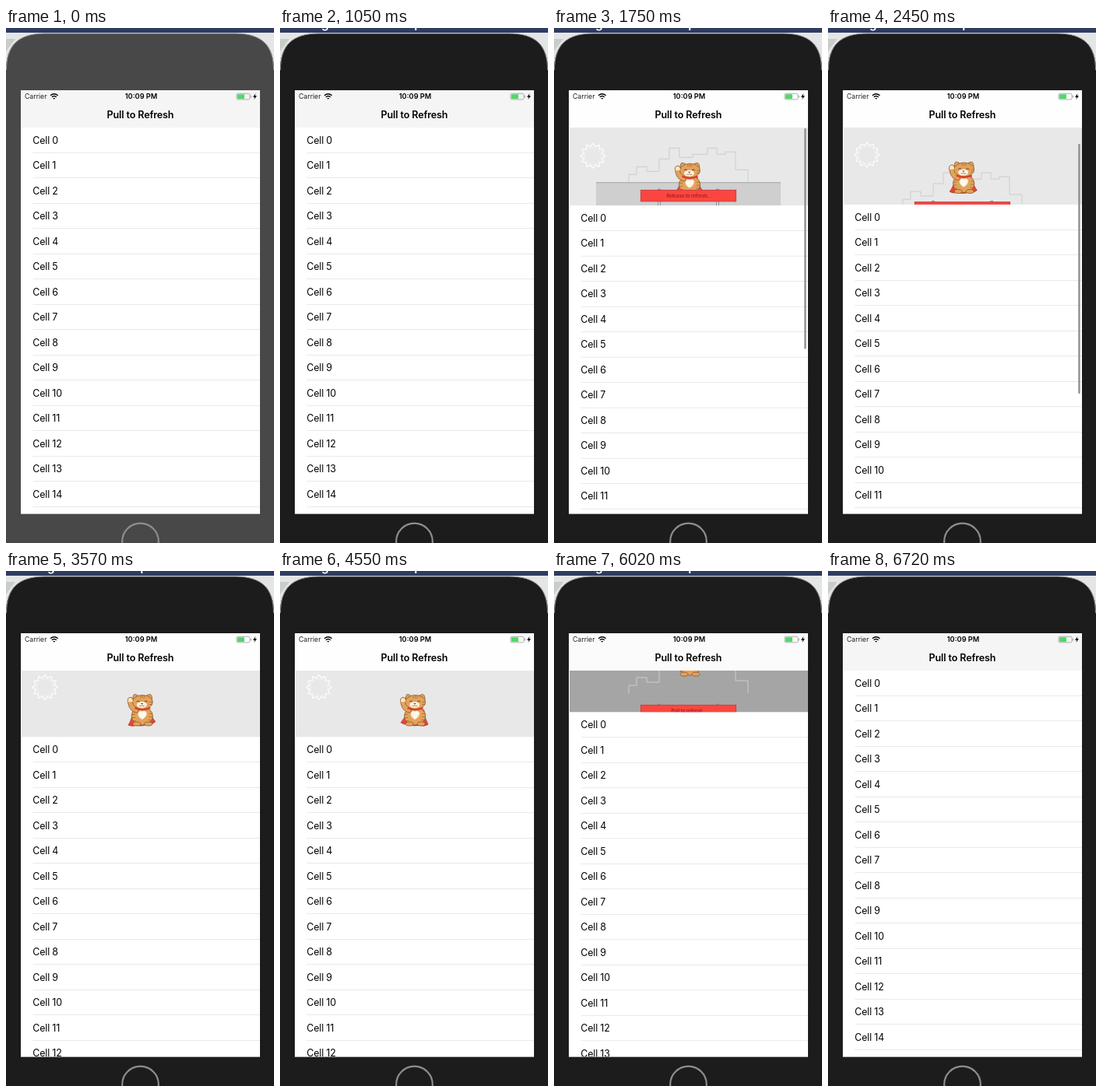
An HTML page for the animation above (6.79 s loop, 344x662 px).

```html
<!DOCTYPE html>
<html lang="en">
<head>
<meta charset="utf-8">
<title>Pull to Refresh</title>
<style>
  html, body { margin: 0; width: 100%; height: 100%; overflow: hidden; background: #222; }
  svg { display: block; width: 100%; height: 100%; }
  text { font-family: Inter, "Open Sans", sans-serif; }
  .row { font-size: 12.4px; letter-spacing: -.14px; }
</style>
</head>
<body>
<svg viewBox="0 0 344 662">
  <defs>
    <clipPath id="screen"><rect x="19" y="80" width="307" height="544.5"/></clipPath>
    <clipPath id="content"><rect x="19" y="128" width="307" height="496.5"/></clipPath>
    <clipPath id="sceneClip"><rect id="sceneBox" x="20" y="128" width="306" height="0"/></clipPath>
  </defs>

  <!-- desktop behind the phone -->
  <rect width="344" height="662" fill="#242727"/>
  <rect y="5" width="344" height="44" fill="#e4e5e6"/>
  <path d="M0 14H12L0 30Z" fill="#c9cdc9"/>
  <path d="M.5 248V302M.5 382V416M.5 500V530M.5 605V632" stroke="#3e6a60"/>
  <rect width="344" height="6" fill="#2f3c61"/>
  <text id="caption" x="20" y=".3" font-size="15.5" font-weight="600" fill="#fff">Design the current tip</text>

  <!-- phone -->
  <path id="bezel" d="M0 662V54C0 22 16 7 50 7H294C328 7 344 22 344 54V662Z"/>
  <path d="M.5 54C.5 22 16 7 50 7H294C328 7 343.5 22 343.5 54" fill="none" stroke="#9a9a9a"/>
  <circle cx="172.5" cy="660" r="23.3" fill="none" stroke="#8d8d8d" stroke-width="2.2"/>

  <g clip-path="url(#screen)">
    <rect x="19" y="80" width="307" height="545" fill="#fff"/>
    <g clip-path="url(#content)">
      <g clip-path="url(#sceneClip)">
        <rect id="sky" x="20" y="128" width="306" height="500"/>
        <path id="buildings" fill="none" stroke="#cdcdcd"
          d="M96-30V-40H106V-50H119V-44H135V-60H148V-74H161V-62H178V-66H197V-74H209V-66H220V-69H233V-46H249V-30"/>
        <g id="sun" fill="none" stroke="#fff"><path id="rays" stroke-width="1.1"/><circle cx="50" cy="-64" r="11" stroke-opacity=".4"/></g>
        <g id="ground">
          <rect x="54" y="-30" width="237" height="130" fill="#cfcfcf"/>
          <path d="M54-29.5H291" stroke="#a6a6a6"/>
        </g>
        <path id="cape" fill="#e8443a" stroke="#a92b25" stroke-width=".7"
          d="M164-36Q162-25 156-17Q161-14 166-16Q173-13 181-16Q186-14 191-18Q186-25 184-36Z"/>
        <g id="cat" fill="#e3a25c" stroke="#8a5829" stroke-width=".8">
          <path d="M162.5-46Q161.500-54 164-55Q167.500-55 169.500-52.500H178.500Q181-55 184.500-55Q187.500-53 186.500-46Z"/>
          <ellipse cx="174" cy="-27" rx="13.700" ry="11.500"/>
          <ellipse cx="167" cy="-17" rx="5" ry="2.500"/>
          <ellipse cx="182" cy="-17" rx="5" ry="2.500"/>
          <path d="M169-31Q158-32 156-43Q154-50 158-51Q163-52 162.500-45Q163-40 169-38Z"/>
          <ellipse cx="174.500" cy="-45" rx="13" ry="9"/>
          <path d="M156-45Q155.200-50 158.500-50.500Q162-50 162-45.500Z" fill="#f8e5c5" stroke="none"/>
          <ellipse cx="173.500" cy="-41.500" rx="6.500" ry="4" fill="#fff4e2" stroke="none"/>
          <path d="M172-53V-50M174.500-53.500V-50M177-53V-50M187-45H183.500M187-42H183M187-30H183M187.500-26H183M186-22H182M161-29H165M161-25H165M162-21H166" fill="none" stroke="#a8682c"/>
          <path d="M167-45.500Q169-47.500 171-45.500M177-45.500Q179-47.500 181-45.500" fill="none" stroke="#4a2f18"/>
          <path d="M172-43.500H175.500L173.700-42Z" fill="#5b3320" stroke="none"/>
          <path d="M170.500-40.500Q172.500-38.500 173.700-41Q175-38.500 177-40.500" fill="none" stroke="#70442a" stroke-width=".7"/>
          <path d="M164.500-37.500Q174-33 184.500-37.500" fill="none" stroke="#e03a32" stroke-width="2.200"/>
          <path d="M174-22.500Q168-26 168.500-31Q171-35 174-33Q178-35 180-31Q180-26 174-22.500Z" fill="#fff8ea" stroke="#e2c79b" stroke-width=".5"/>
        </g>
        <g id="sign">
          <path d="M133.500-21.300V30M136.500-21.300V30M208.500-21.300V30M211.500-21.300V30M133-21H137M208-21H212" stroke="#777" stroke-width=".7"/>
          <rect x="111.500" y="-19.800" width="122" height="14.300" fill="#fb4640" stroke="#cf4440" stroke-width="1.200"/>
          <text id="signText" x="173.500" y="-10.600" font-size="6" font-weight="600" text-anchor="middle" fill="#a3201d"></text>
        </g>
      </g>
      <g id="list"></g>
      <rect id="bar" x="321.300" width="2.300" rx="1.150" fill="#8b8b8b"/>
    </g>

    <!-- navigation and status bar -->
    <rect id="nav" x="19" y="80" width="307" height="48"/>
    <text x="24" y="91.200" font-size="8.700" fill="#222">Carrier</text>
    <path d="M57 86.800Q61.800 82.800 66.600 86.800M58.800 88.800Q61.800 86.200 64.800 88.800" fill="none" stroke="#000" stroke-width="1.400"/>
    <path d="M60.200 89.900H63.400L61.800 91.700Z"/>
    <text x="173.500" y="91.400" font-size="9.200" font-weight="600" text-anchor="middle">10:09 PM</text>
    <rect x="296" y="84.300" width="17" height="7.600" rx="1.700" fill="none" stroke="#9a9a9a" stroke-width=".8"/>
    <rect x="297" y="85.200" width="9" height="5.800" rx=".8" fill="#52d769"/>
    <path d="M314.300 86.700V89.500" stroke="#9a9a9a"/>
    <path d="M320.500 84L317 88.700H319.300L318.300 92L322 87.300H319.600Z"/>
    <text x="172.500" y="116.200" font-size="12.500" font-weight="600" letter-spacing="-.1" text-anchor="middle">Pull to Refresh</text>
  </g>
</svg>
<script>
const LOOP = 6790, STEP = 70;
const TOP = 128, ROW = 32.5, SCENE = 85.5, REACH = 100.3, SINK = 85;
const DRAG = 1150, RELEASE = 2365, FINISH = 5850, FINISHED = 6260;

const $ = id => document.getElementById(id);
const clamp = v => Math.min(1, Math.max(0, v));
const span = (t, a, b) => clamp((t - a) / (b - a));
const lerp = (a, b, k) => a + (b - a) * k;
const smooth = k => k * k * (3 - 2 * k);
const easeOut = k => 1 - (1 - k) ** 2;
const gray = v => { const c = Math.round(v); return `rgb(${c},${c},${c})`; };

$('list').innerHTML = '<rect x="19" width="307" height="660" fill="#fff"/>' +
  Array.from({ length: 20 }, (_, i) =>
    `<text class="row" x="34.3" y="${i * ROW + 20.7}">Cell ${i}</text>` +
    `<rect x="34.5" y="${(i + 1) * ROW - .4}" width="292" height=".4" fill="#c8c7cc"/>`
  ).join('');

$('rays').setAttribute('d', 'M' + Array.from({ length: 24 }, (_, i) => {
  const a = i * Math.PI / 12, r = i % 2 ? 12.3 : 16;
  return `${(50 + r * Math.sin(a)).toFixed(1)} ${(-64 - r * Math.cos(a)).toFixed(1)}`;
}).join('L') + 'Z');

function pullAt(t) {
  if (t < RELEASE) return REACH * smooth(easeOut(span(t, DRAG, 1800)));
  if (t < FINISH) return lerp(REACH, SCENE, smooth(span(t, 2400, 2680)));
  return SCENE * (1 - smooth(span(t, FINISH, FINISHED)));
}

function draw(t) {
  const pull = pullAt(t), p = clamp(pull / SCENE), bottom = TOP + pull;
  const sink = smooth(span(t, RELEASE, RELEASE + 200)) * SINK * p;
  const refreshing = t > RELEASE && t < FINISH;

  // Each layer drifts in at its own rate as the list is pulled.
  const place = (id, ratio, drop = 0, x = 0, extra = '') =>
    $(id).setAttribute('transform',
      `translate(${x} ${bottom - ratio * SCENE * (1 - p) + drop})${extra}`);

  // Shiver: 200 ms each way.
  const beat = Math.abs(((t - RELEASE) / 200 % 2 + 2) % 2 - 1);
  const sway = refreshing ? lerp(-1, 1, smooth(beat)) : 0;

  place('buildings', 1.5, sink);
  place('sun', 3);
  place('ground', .5, sink);
  place('cape', -1, 0, 0, ` rotate(${sway * -5.6} 173 -27)`);
  place('cat', 1, 0, sway * .8);
  place('sign', .5, sink / 2);
  $('signText').textContent = (p < 1 ? 'Pull' : 'Release') + ' to refresh...';

  $('sceneBox').setAttribute('height', pull);
  $('sky').setAttribute('fill', gray(255 * (.21 + .7 * p)));
  $('nav').setAttribute('fill', gray(lerp(245, 254, p)));
  $('list').setAttribute('transform', `translate(0 ${bottom})`);

  const barTop = lerp(TOP + 1, 213, smooth(span(t, 2385, 2590)));
  const barEnd = lerp(TOP + 385 - pull, 485, smooth(span(t, 2330, 2500)));
  $('bar').setAttribute('y', barTop);
  $('bar').setAttribute('height', barEnd - barTop);
  $('bar').setAttribute('opacity', span(t, DRAG, DRAG + 60) * (1 - span(t, 3200, 3420)));

  $('bezel').setAttribute('fill', t < 1050 ? '#484848' : '#1c1c1c');
  $('caption').setAttribute('opacity', t >= 910 && t < 6720 ? 1 : 0);
}

const start = performance.now();
function tick() {
  const t = (performance.now() - start) % LOOP;
  draw(Math.floor(t / STEP) * STEP);
  requestAnimationFrame(tick);
}
tick();
</script>
</body>
</html>
```
